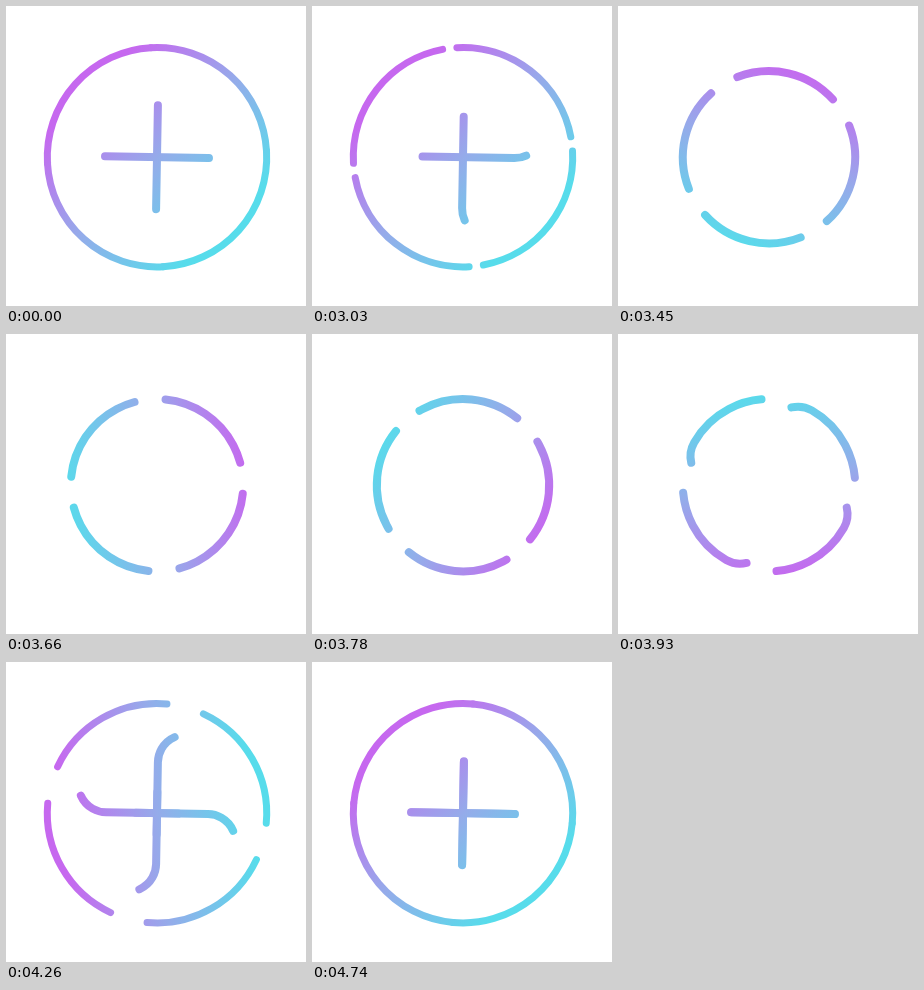
An HTML page with a canvas for the animation above (4.89 s loop, 300x300 px).

```html
<!DOCTYPE html>
<html>
<head>
<meta charset="utf-8">
<style>
html, body { margin: 0; width: 100%; height: 100%; overflow: hidden; background: #fff; }
canvas { display: block; }
</style>
</head>
<body>
<canvas id="stage" width="300" height="300"></canvas>
<script>
const ctx = document.getElementById('stage').getContext('2d');
const LOOP = 4890, START = 3000, STEP = 30;
const RAD = Math.PI / 180, QUARTER = Math.PI / 2;
const ARM = 52, BEND_R = 28, BEND_Y = 51;
const TRACK_R = BEND_R + Math.hypot(BEND_R, BEND_Y);
const JOIN = Math.atan2(BEND_Y, BEND_R);
const RING_R = 109.7;

// Travel of a strand's tail along its track: [time, distance, speed]
const KEYS = [
  [0, 0, 0.385], [240, 93, 0.4], [660, 277, 0.445],
  [930, 397, 0.42], [1260, 506, 0.2], [1740, 537.6, 0]
];

// Out along one arm, around the circle, and back in along the next arm
const track = new Path2D();
track.moveTo(0, -ARM);
track.arc(BEND_R, BEND_Y, BEND_R, Math.PI, JOIN, true);
track.arc(0, 0, TRACK_R, JOIN, -JOIN - QUARTER, true);
track.arc(-BEND_Y, -BEND_R, BEND_R, -JOIN - QUARTER, -3 * QUARTER, true);
track.lineTo(ARM, 0);

const clamp = x => Math.min(1, Math.max(0, x));
const smooth = x => x * x * (3 - 2 * x);

function travel(t) {
  const i = KEYS.findIndex(k => t < k[0]);
  if (i < 0) return KEYS[KEYS.length - 1][1];
  const [t0, d0, v0] = KEYS[i - 1], [t1, d1, v1] = KEYS[i];
  const h = t1 - t0, p = (t - t0) / h, q = 1 - p;
  return d0 + (d1 - d0) * smooth(p) + h * p * q * (v0 * q - v1 * p);
}

function gradient(angle) {
  const x = 95 * Math.cos(angle), y = 95 * Math.sin(angle);
  const g = ctx.createLinearGradient(x, y, -x, -y);
  g.addColorStop(0, '#c668ef');
  g.addColorStop(0.5, '#95abea');
  g.addColorStop(1, '#57dceb');
  return g;
}

function drawRing(t, hue) {
  const leaving = t < 500;
  const span = QUARTER * (leaving ? clamp(1 - t / 360) : 1 - (1 - clamp((t - 1000) / 490)) ** 2);
  if (span <= 0) return;
  ctx.lineWidth = 7;
  ctx.strokeStyle = gradient(hue);
  for (let k = 0; k < 4; k++) {
    const from = k * QUARTER + (leaving ? -3.2 * RAD : 5.2 * RAD - span);
    ctx.beginPath();
    ctx.arc(0, 0, RING_R, from, from + span);
    ctx.stroke();
  }
}

function drawStrands(t, hue) {
  const count = t < 45 ? 2 : 4;
  ctx.lineWidth = 8;
  ctx.setLineDash([2 * ARM, 2000]);
  ctx.lineDashOffset = -travel(t);
  for (let k = 0; k < count; k++) {
    const turn = RAD - k * QUARTER;
    ctx.save();
    ctx.rotate(turn);
    ctx.strokeStyle = gradient(hue - turn);
    ctx.stroke(track);
    ctx.restore();
  }
  ctx.setLineDash([]);
}

function draw(now) {
  const clock = Math.floor(now % LOOP / STEP) * STEP;
  const t = Math.max(0, clock - START);
  const hue = (-135 + 360 * smooth(clamp(t / 1650))) * RAD;
  ctx.setTransform(1, 0, 0, 1, 0, 0);
  ctx.fillStyle = '#fff';
  ctx.fillRect(0, 0, 300, 300);
  ctx.translate(151, 151.2);
  ctx.lineCap = 'round';
  drawRing(t, hue);
  drawStrands(t, hue);
}

const begin = performance.now();
function tick() {
  draw(performance.now() - begin);
  requestAnimationFrame(tick);
}
tick();
</script>
</body>
</html>
```
